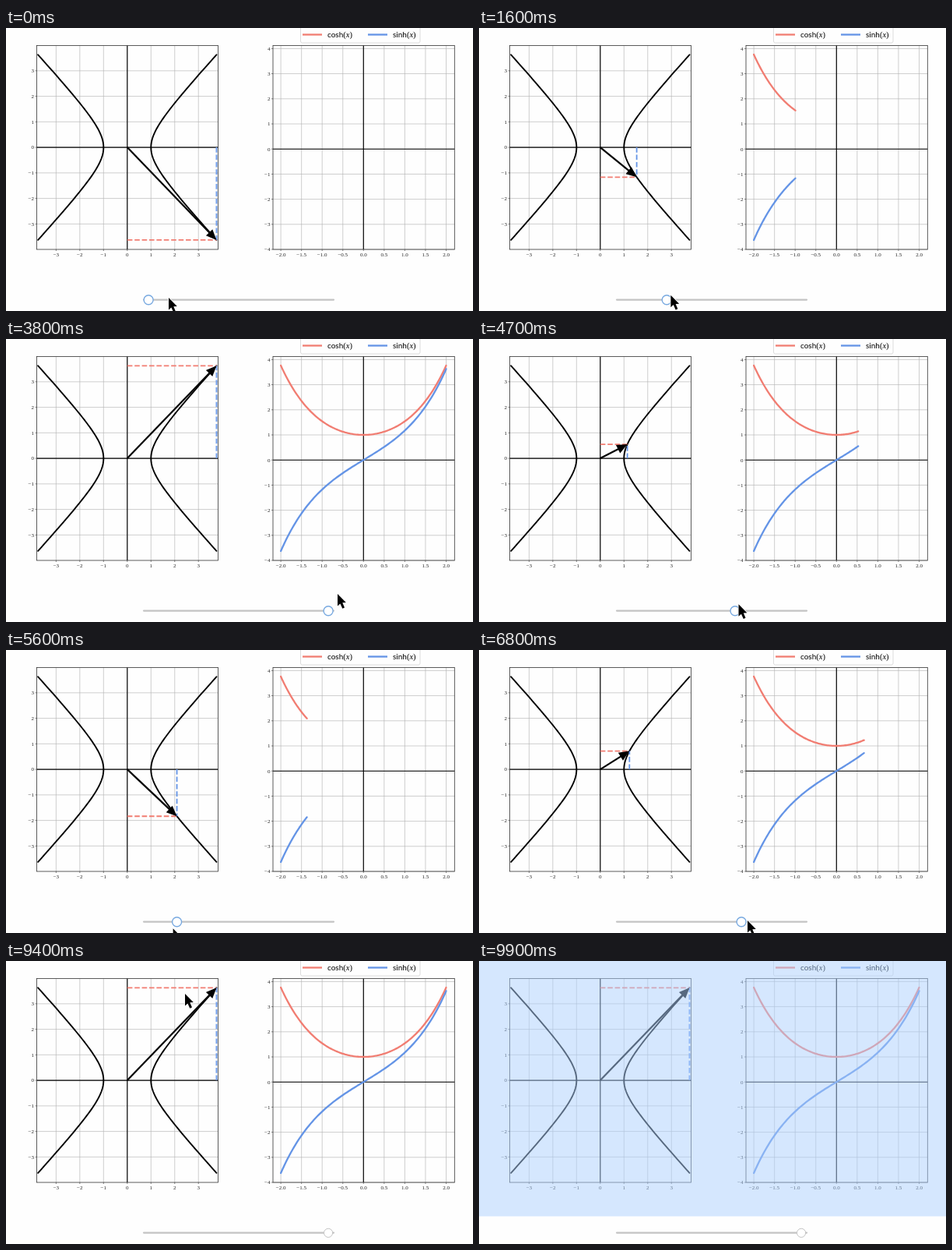
An HTML page with a canvas that plays this animation: 600x363 px, repeating every 10 s.

```html
<!DOCTYPE html>
<html lang="en">
<head>
<meta charset="utf-8">
<title>Hyperbolic functions</title>
<style>
  html, body { margin: 0; width: 100%; height: 100%; overflow: hidden; background: #fefefe; }
  canvas { display: block; width: 600px; height: 363px; }
</style>
</head>
<body>
<canvas id="stage"></canvas>
<script>
const canvas = document.getElementById('stage');
const ctx = canvas.getContext('2d');
const ratio = window.devicePixelRatio || 1;
canvas.width = 600 * ratio;
canvas.height = 363 * ratio;

const LOOP = 10000, STEP = 100;
const RED = '#f17d72', BLUE = '#6494e6', BLACK = '#000';
const SERIF = '"Liberation Serif", serif', SANS = 'Lato, sans-serif';

const range = (from, to, step = 1) =>
  Array.from({ length: Math.round((to - from) / step) + 1 }, (_, i) => from + i * step);

const TOP = 22.5, BOTTOM = 284;
const hyperbolaPlot = {
  left: 39.5, right: 272.5, ox: 155.8, oy: 153.1, sx: 30.48, sy: 32.75,
  xTicks: range(-3, 3), yTicks: range(-3, 3), digits: 0
};
const graphPlot = {
  left: 343, right: 576.3, ox: 459.3, oy: 155.2, sx: 53.1, sy: 32.2,
  xTicks: range(-2, 2, 0.5), yTicks: range(-4, 4), digits: 1
};

// The pointer drags the slider value u right, left and right again, then wanders off.
const initial = { x: 209, y: 346, u: -2 };
const moves = [
  { start: 0, end: 400, x: 186, y: 348 },
  { start: 600, end: 3700, x: 426, y: 327, u: 2, power: 1.22 },
  { start: 4000, end: 5900, x: 175, y: 363, u: -2 },
  { start: 6000, end: 7200, x: 430, y: 339, u: 2 },
  { start: 7300, end: 8200, x: 602, y: 325 },
  { start: 8400, end: 8500, x: 545, y: 56 },
  { start: 8500, end: 8800, x: 547, y: 92 },
  { start: 8800, end: 9200, x: 230, y: 42 },
  { start: 9400, end: 9700, x: 205, y: -25 }
];

function stateAt(time) {
  const state = { ...initial };
  for (const { start, end, power = 1, ...goal } of moves) {
    if (time <= start) break;
    const progress = Math.min(1, (time - start) / (end - start)) ** power;
    for (const key in goal) state[key] += (goal[key] - state[key]) * progress;
  }
  return state;
}

const toPixel = (plot, x, y) => [plot.ox + x * plot.sx, plot.oy - y * plot.sy];

function trace(points) {
  ctx.beginPath();
  points.forEach(([x, y]) => ctx.lineTo(x, y));
}

function stroke(points, color, width, { dash = [], cap = 'butt' } = {}) {
  trace(points);
  ctx.strokeStyle = color;
  ctx.lineWidth = width;
  ctx.lineCap = cap;
  ctx.setLineDash(dash);
  ctx.stroke();
  ctx.setLineDash([]);
}

function curve(plot, fx, fy, end, color, width) {
  const points = range(0, 100).map(i => {
    const v = -2 + (end + 2) * i / 100;
    return toPixel(plot, fx(v), fy(v));
  });
  stroke(points, color, width, { cap: 'round' });
}

function tickLabel(value, digits, x, y, align) {
  ctx.font = `7px ${SERIF}`;
  ctx.fillStyle = '#222';
  ctx.textAlign = align;
  ctx.fillText(value.toFixed(digits).replace('-', '\u2212'), x, y);
}

function drawAxes({ left, right, ox, oy, sx, sy, xTicks, yTicks, digits }) {
  for (const value of xTicks) {
    const x = ox + value * sx;
    stroke([[x, TOP], [x, BOTTOM]], '#b4b4b4', 0.65);
    stroke([[x, BOTTOM], [x, BOTTOM + 2]], '#333', 0.6);
    tickLabel(value, digits, x, 292.5, 'center');
  }
  for (const value of yTicks) {
    const y = oy - value * sy;
    stroke([[left, y], [right, y]], '#b4b4b4', 0.65);
    stroke([[left - 2, y], [left, y]], '#333', 0.6);
    tickLabel(value, 0, left - 3.5, y + 2.3, 'right');
  }
  stroke([[left, oy], [right, oy]], BLACK, 1.15);
  stroke([[ox, TOP], [ox, BOTTOM]], BLACK, 1.15);
  ctx.strokeStyle = '#333';
  ctx.lineWidth = 0.8;
  ctx.strokeRect(left, TOP, right - left, BOTTOM - TOP);
}

function drawArrow(x0, y0, x1, y1) {
  const length = Math.hypot(x1 - x0, y1 - y0);
  ctx.save();
  ctx.translate(x0, y0);
  ctx.rotate(Math.atan2(y1 - y0, x1 - x0));
  stroke([[0, 0], [length - 10, 0]], BLACK, 2.2);
  trace([[length, 0], [length - 13.5, -5.8], [length - 13.5, 5.8]]);
  ctx.fillStyle = BLACK;
  ctx.fill();
  ctx.restore();
}

function drawHyperbola(u) {
  const plot = hyperbolaPlot;
  const dashed = { dash: [6.6, 2.8] };
  const [x, y] = toPixel(plot, Math.cosh(u), Math.sinh(u));
  drawAxes(plot);
  curve(plot, Math.cosh, Math.sinh, 2, BLACK, 1.9);
  curve(plot, v => -Math.cosh(v), Math.sinh, 2, BLACK, 1.9);
  stroke([[plot.ox, y], [x, y]], RED, 1.8, dashed);
  stroke([[x, plot.oy], [x, y]], BLUE, 1.8, dashed);
  drawArrow(plot.ox, plot.oy, x, y);
}

function drawGraph(u) {
  drawAxes(graphPlot);
  if (u <= -2) return;
  curve(graphPlot, v => v, Math.cosh, u, RED, 2.3);
  curve(graphPlot, v => v, Math.sinh, u, BLUE, 2.3);
}

function legendEntry(name, color, x) {
  stroke([[x, 8.5], [x + 25, 8.5]], color, 2.3);
  ctx.fillStyle = BLACK;
  ctx.textAlign = 'left';
  let textX = x + 32;
  const write = (text, font) => {
    ctx.font = font;
    ctx.fillText(text, textX, 11.5);
    textX += ctx.measureText(text).width;
  };
  write(name, `10px ${SANS}`);
  write('(', `10.5px ${SERIF}`);
  write('x', `italic 10.5px ${SERIF}`);
  write(')', `10.5px ${SERIF}`);
}

function drawLegend() {
  ctx.beginPath();
  ctx.roundRect(378.5, -6, 153.5, 25, 2);
  ctx.fillStyle = '#fefefe';
  ctx.fill();
  ctx.strokeStyle = '#d4d4d4';
  ctx.lineWidth = 0.8;
  ctx.stroke();
  legendEntry('cosh', RED, 381);
  legendEntry('sinh', BLUE, 465);
}

function drawSlider(u, focused) {
  stroke([[177, 348.6], [421, 348.6]], '#c3c3c3', 2.2, { cap: 'round' });
  ctx.beginPath();
  ctx.arc(298.6 + u * 57.75, 348.8, focused ? 6 : 5.6, 0, 2 * Math.PI);
  ctx.fillStyle = '#fff';
  ctx.fill();
  ctx.strokeStyle = focused ? '#78a9e0' : '#c4c4c4';
  ctx.lineWidth = focused ? 1.4 : 1;
  ctx.stroke();
}

function drawPointer(x, y) {
  ctx.save();
  ctx.translate(x, y);
  trace([[0, 0], [0, 15.5], [3.4, 12.4], [6.3, 18.8], [9, 17.6], [6.3, 11.3], [10.8, 11]]);
  ctx.closePath();
  ctx.lineJoin = 'round';
  ctx.strokeStyle = '#fff';
  ctx.lineWidth = 1.6;
  ctx.stroke();
  ctx.fillStyle = BLACK;
  ctx.fill();
  ctx.restore();
}

function draw(time) {
  const { x, y, u } = stateAt(time);
  ctx.setTransform(ratio, 0, 0, ratio, 0, 0);
  ctx.fillStyle = '#fefefe';
  ctx.fillRect(0, 0, 600, 363);
  drawHyperbola(u);
  drawGraph(u);
  drawLegend();
  if (time >= 9500) {
    ctx.fillStyle = 'rgba(173, 209, 255, 0.5)';
    ctx.fillRect(0, 0, 600, 327.5);
  }
  drawSlider(u, time < 8500);
  drawPointer(x, y);
}

const start = performance.now();
function tick() {
  const elapsed = (performance.now() - start) % LOOP;
  draw(Math.floor(elapsed / STEP) * STEP);
  requestAnimationFrame(tick);
}
tick();
</script>
</body>
</html>
```
